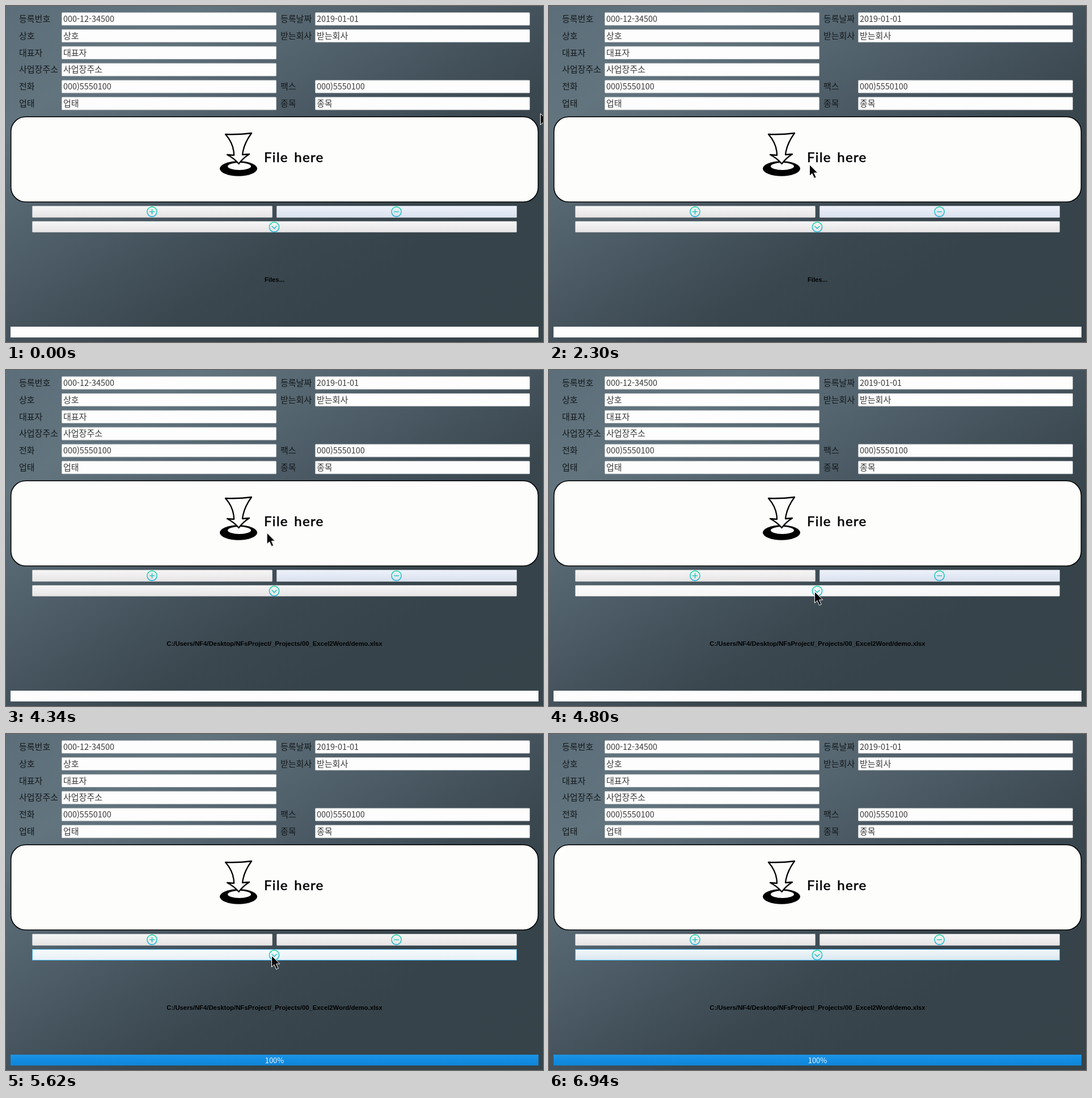
Recreate the animation shown at these times as an HTML page. Size 947 by 592 pixels, loop 6.96 s.

```html
<!DOCTYPE html>
<html lang="ko">
<head>
<meta charset="utf-8">
<title>File form</title>
<style>
  @property --done { syntax: "<integer>"; inherits: true; initial-value: 0; }
  :root { --loop: 6960ms linear infinite both; --korean: "Noto Sans CJK KR Light", "Noto Sans CJK KR", "Noto Sans CJK", sans-serif; }
  html, body { margin: 0; width: 100%; height: 100%; overflow: hidden; }
  body {
    position: relative;
    background: linear-gradient(to bottom right,
      #5c6e79 0, #62747e 18%, #53636d 34%, #44525c 50%, #3a474f 62%, #36434a 75%, #36444a 100%);
  }
  svg { position: absolute; left: 0; top: 0; display: block; }
  .form text { font: 300 15px var(--korean); fill: #3a3a3a; }
  .form .label { fill: #14191c; }
  .form .num { font-size: 14.4px; }
  .field { fill: #fdfdfd; stroke: #c9cdd0; stroke-width: .8; }
  .drop-label {
    font: 400 24px Lato, sans-serif; letter-spacing: 1.3px; word-spacing: 3px;
    stroke: #000; stroke-width: .6;
  }
  .path { font: 700 11.3px "Liberation Sans", Arial, sans-serif; text-anchor: middle; }

  .empty { animation: empty var(--loop); }
  .loaded { animation: loaded var(--loop); }
  .old-focus { animation: old-focus var(--loop); }
  .focus { animation: focus var(--loop); }
  .hover { animation: hover var(--loop); }
  .press { animation: press var(--loop); }
  .cursor { animation: cursor var(--loop); }

  .bar, .bar div { position: absolute; box-sizing: border-box; }
  .bar {
    left: 8px; top: 565px; width: 931px; height: 19px;
    background: #fdfdfd; overflow: hidden;
    animation: progress var(--loop);
  }
  .fill {
    left: 0; top: 0; height: 19px; width: calc(var(--done) * 1%); overflow: hidden;
    background: linear-gradient(#1d94e6, #118be0 55%, #0f86d9);
  }
  .percent {
    left: 0; top: 0; width: 931px; text-align: center;
    font: 300 13px/19px var(--korean); color: #222;
    counter-reset: done var(--done);
    animation: focus var(--loop);
  }
  .percent::after { content: counter(done) "%"; }
  .fill .percent { color: #eef6fc; }

  @keyframes empty { 0%, 40.22% { opacity: 1 } 40.23%, 100% { opacity: 0 } }
  @keyframes loaded { 0%, 40.22% { opacity: 0 } 40.23%, 100% { opacity: 1 } }
  @keyframes old-focus { 0%, 70.97% { opacity: 1 } 70.98%, 100% { opacity: 0 } }
  @keyframes focus { 0%, 70.97% { opacity: 0 } 70.98%, 100% { opacity: 1 } }
  @keyframes hover {
    0%, 67.3% { opacity: 0 }
    68.8%, 70.97% { opacity: .65 }
    70.98%, 82.8% { opacity: .35 }
    84.6%, 100% { opacity: 0 }
  }
  @keyframes press {
    0%, 70.97% { opacity: 0 }
    70.98%, 72.4% { opacity: .8 }
    73%, 100% { opacity: 0 }
  }
  @keyframes progress {
    0%, 70.97% { --done: 0 }
    80.6%, 100% { --done: 100 }
  }
  @keyframes cursor {
    0%, .287% { transform: translate(942px, 189px) }
    1.6% { transform: translate(949px, 182px) }
    22.12% { transform: translate(949px, 240px) }
    22.13% { transform: translate(917px, 240px); animation-timing-function: ease-in-out }
    30.75%, 32.75% { transform: translate(458px, 278px) }
    33.04%, 60.92% { transform: translate(459px, 279px); animation-timing-function: ease-in-out }
    68.95%, 82.76% { transform: translate(468px, 390px); animation-timing-function: ease-in }
    88.6%, 100% { transform: translate(949px, 320px) }
  }
</style>
</head>
<body>
<svg width="947" height="592" viewBox="0 0 947 592">
  <defs>
    <linearGradient id="button" x2="0" y2="1">
      <stop stop-color="#f7f6f6"/><stop offset="1" stop-color="#e6e4e4"/>
    </linearGradient>
    <linearGradient id="blue-tint" x2="0" y2="1">
      <stop stop-color="#edf1fa"/><stop offset="1" stop-color="#dae1ee"/>
    </linearGradient>
    <linearGradient id="active" x2="0" y2="1">
      <stop stop-color="#f3f7f9"/><stop offset="1" stop-color="#d9e8f0"/>
    </linearGradient>
    <linearGradient id="mint" gradientUnits="userSpaceOnUse" x1="0" y1="-9" x2="0" y2="9">
      <stop stop-color="#25dca5"/><stop offset="1" stop-color="#27b1df"/>
    </linearGradient>
    <path id="ring" d="M-8.6 0a8.6 8.6 0 1 0 17.2 0a8.6 8.6 0 1 0-17.2 0"/>
  </defs>

  <g class="form" id="form"></g>

  <rect x="8.7" y="195.2" width="929.8" height="150" rx="26" fill="#fdfdfc" stroke="#000" stroke-width="1.6"/>
  <ellipse cx="410" cy="286.5" rx="33" ry="13.2"/>
  <ellipse cx="411.5" cy="282.5" rx="20.5" ry="6.5" fill="#fdfdfc"/>
  <path d="M387 226Q410 227 433 224Q419 243 417 262L429 261Q418 268 410.5 278Q402 268 390 262L402 263Q402 243 387 226Z"
        fill="#fdfdfc" stroke="#000" stroke-width="2.3" stroke-linejoin="round"/>
  <text class="drop-label" x="455" y="275">File here</text>

  <g stroke="#c0c4c7" stroke-width=".8">
    <rect x="46.5" y="352.5" width="423" height="20" rx="1" fill="url(#button)"/>
    <rect x="477.5" y="352.5" width="423" height="20" rx="1" fill="url(#button)"/>
    <rect class="old-focus" x="477.5" y="352.5" width="423" height="20" rx="1" fill="url(#blue-tint)"/>
    <rect x="46.5" y="379.5" width="854" height="19" rx="1" fill="url(#button)"/>
    <rect class="focus" x="46.5" y="379.5" width="854" height="19" rx="1" fill="url(#active)" stroke="#49b2ee" stroke-width="1"/>
  </g>
  <rect class="hover" x="47" y="380" width="853" height="18" fill="#fff"/>
  <rect class="press" x="47" y="380" width="853" height="18" fill="#c9e2f2"/>

  <g fill="none" stroke="url(#mint)" stroke-width="1.6" stroke-linecap="round">
    <g transform="translate(257.5 362.5)"><use href="#ring"/><path d="M-4 0H4M0-4V4"/></g>
    <g transform="translate(688.5 362.5)"><use href="#ring"/><path d="M-4 0H4M0 0V.01"/></g>
    <g transform="translate(473 389.5)"><use href="#ring"/><path d="M-4-1.5L0 2.5L4-1.5"/></g>
  </g>

  <text class="path empty" x="473.5" y="486">Files...</text>
  <text class="path loaded" x="473.5" y="486">C:/Users/NF4/Desktop/NFsProject/_Projects/00_Excel2Word/demo.xlsx</text>
</svg>

<div class="bar">
  <div class="percent"></div>
  <div class="fill"><div class="percent"></div></div>
</div>

<svg width="947" height="592" viewBox="0 0 947 592">
  <path class="cursor" d="M.5 .5V20.5L5 16.3L8.7 24.5L12.2 23L8.6 15H14.8Z" fill="#080808" stroke="#fff"/>
</svg>

<script>
  const form = document.getElementById("form");
  const columns = [{ labelX: 23, fieldX: 98 }, { labelX: 484, fieldX: 545 }];

  function addRow(column, row, label, value) {
    const { labelX, fieldX } = columns[column];
    const top = 11.7 + row * 29.8;
    const baseline = top + 16.3;
    const kind = /^\d/.test(value) ? "num" : "";
    form.insertAdjacentHTML("beforeend", `
      <rect class="field" x="${fieldX + .5}" y="${top}" width="378" height="22.2" rx="1"/>
      <text class="label" x="${labelX}" y="${baseline}">${label}</text>
      <text class="${kind}" x="${fieldX + 3}" y="${baseline}">${value}</text>`);
  }

  addRow(0, 0, "등록번호", "000-12-34500");
  addRow(0, 1, "상호", "상호");
  addRow(0, 2, "대표자", "대표자");
  addRow(0, 3, "사업장주소", "사업장주소");
  addRow(0, 4, "전화", "000)5550100");
  addRow(0, 5, "업태", "업태");
  addRow(1, 0, "등록날짜", "2019-01-01");
  addRow(1, 1, "받는회사", "받는회사");
  addRow(1, 4, "팩스", "000)5550100");
  addRow(1, 5, "종목", "종목");
</script>
</body>
</html>
```
